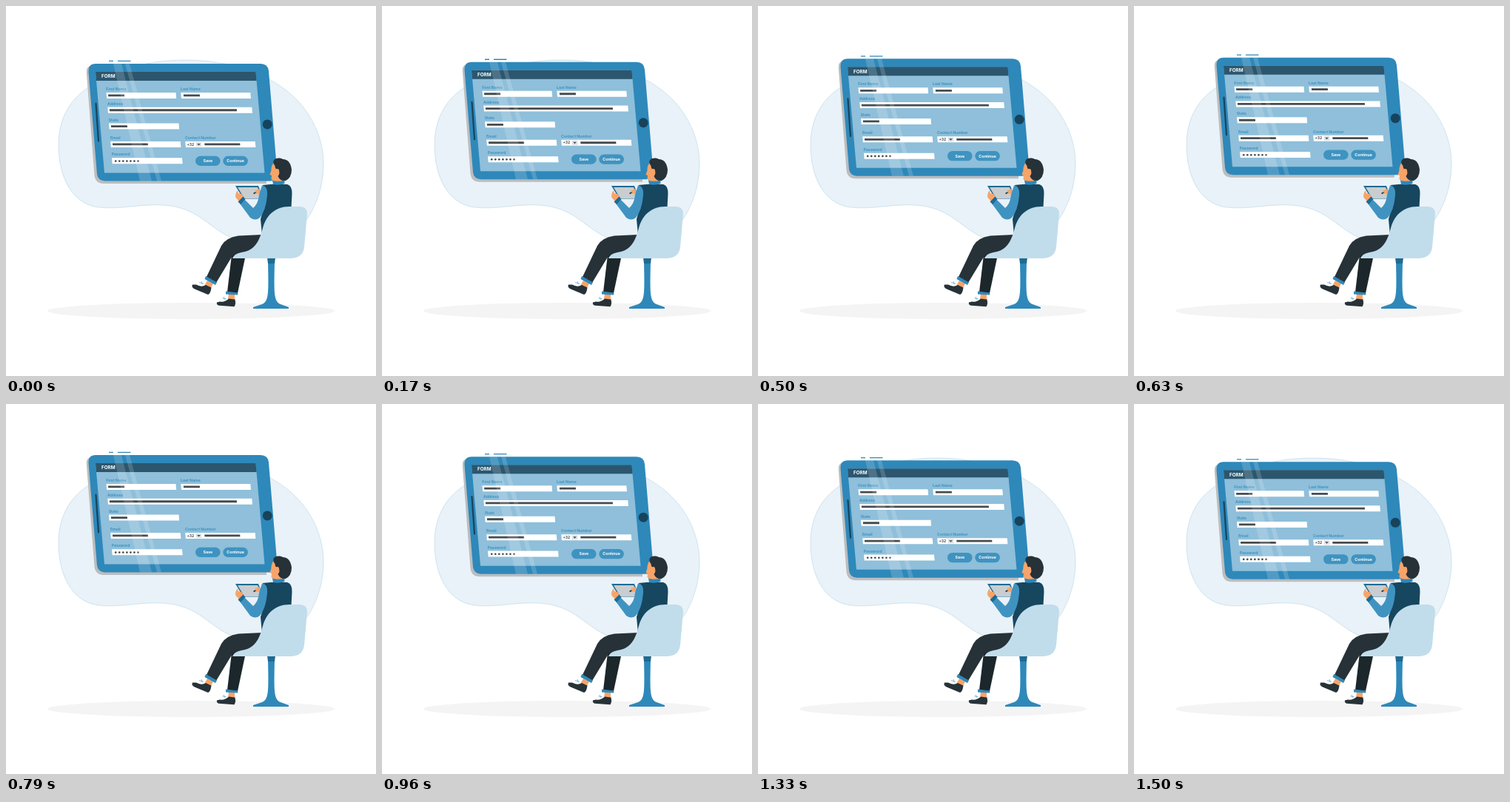
Animation of 500 by 500 pixels, one loop 1540 ms. Source, as an HTML page:

```html
<!DOCTYPE html>
<html lang="en">
<head>
<meta charset="utf-8">
<title>Form on a floating tablet</title>
<style>
html, body { margin: 0; width: 100%; height: 100%; overflow: hidden; background: #fff; }
svg { display: block; width: 100vw; height: 100vh; }
text { font-family: Inter, "Open Sans", sans-serif; font-weight: 700; }
</style>
</head>
<body>
<svg viewBox="0 0 500 500">
  <path d="M71 188C71 150 88 121 122 104C160 84 192 73 242 73C300 73 352 90 386 120C414 145 429 180 429 213C429 250 414 288 388 308C362 326 326 323 300 311C276 299 262 279 232 272C196 263 160 276 125 272C86 267 71 226 71 188Z" fill="#e9f2f8" stroke="#b4d6e9" stroke-width=".6"/>
  <ellipse cx="250" cy="412" rx="194" ry="11" fill="#f4f4f4"/>

  <g id="tablet">
    <path d="M139 74.5h6M151 74.5h17.500" stroke="#2e88ba" stroke-width="1.300"/>
    <path d="M119 81Q108 80 108.800 90L119.500 229Q121 240 132 240H352L350 81Z" fill="#bbbdbf"/>
    <path id="case" d="M121 78H344Q354 78 355 88L366.500 226Q367 236 357 236.500H134Q124 236 123 227L111.500 89Q111 78 121 78Z" fill="#2e88ba"/>
    <path d="M121 89H337.500L349.500 225.500H133Z" fill="#8fbfda"/>
    <path d="M121 89H337.500L338.600 101H122Z" fill="#2b566e"/>
    <path d="M121.500 132L125 182.500" stroke="#17435b" stroke-width="2.200" stroke-linecap="round"/>
    <circle cx="353.200" cy="160" r="6.500" fill="#17435b"/>
    <g id="form"></g>
    <path d="M145 78H156L197 236.500H181ZM161 78H167L210 236.500H204Z" fill="#fff" opacity=".16"/>
  </g>

  <!-- chair stem and far leg -->
  <path d="M354 346H363C362 390 362 399 371 403L382 407V409H334V407L346 403C355 399 355 390 354 346Z" fill="#2e88ba"/>
  <path d="M353 340H364L363 348H354Z" fill="#1f6a92"/>
  <path d="M301 388L309 389L309 398L300 397Z" fill="#f7a469"/>
  <path d="M305 336H324L313 388L299 386.500Z" fill="#1c272c"/>
  <path d="M297 385.500L313.500 387.500L313 390.500L297 389.500Z" fill="#2e88ba"/>
  <path d="M285 400.500Q284 404 288 404.700L308.500 406.200Q311 403 309.500 396.500L301 395.500Q296 400.500 289 399.500Z" fill="#263238"/>
  <path d="M292.500 395l5 .5M294 393l2 4" stroke="#7db9d9" stroke-width="1" fill="none"/>

  <!-- near leg -->
  <path d="M272 371L280 375L276 383L268 378Z" fill="#f7a469"/>
  <path d="M346 309L314 310.500Q297 313 291 324L271 366L284 374L307 336L346 338Z" fill="#263238"/>
  <path d="M270 365L285 373.500L283 377L268.500 369Z" fill="#2e88ba"/>
  <path d="M252 376.500Q250 380 255 382.500L273 390Q276.500 389 277.500 380.500L270 377Q264 380.500 257 376.500Z" fill="#263238"/>
  <path d="M261 373.500l6 2M264 372l1.500 4" stroke="#7db9d9" stroke-width="1" fill="none"/>

  <!-- body and head -->
  <path d="M347 242Q362 240 380 241Q387 243 386.500 254L384 300L346 310L344 288Q352 266 347 242Z" fill="#17465f"/>
  <path d="M361 226H373L374 239H363Z" fill="#f7a469"/>
  <path d="M362 211Q358 217 358.500 222L356.500 228L359 229L358.500 234Q360 237 365 236L372 229V212Z" fill="#f7a469"/>
  <path d="M361.500 213Q360 206 368 205.500Q372 205 374 207Q384 207 386 221Q386 233 377 236.500Q370 236 367.500 230Q371 226 368 220Q364 222 363.500 216Z" fill="#263238"/>
  <circle cx="366" cy="223" r="2.800" fill="#f7a469"/>
  <path d="M360 235.500Q367 238 376 235.500L376.500 240Q368 243 361 241Z" fill="#2e88ba"/>

  <!-- held slate and arms -->
  <path d="M310 243H341L348 261H321Z" fill="#1f6a92"/>
  <path d="M313 245H340L346 260H322Z" fill="#c9cdd0"/>
  <path d="M320 261.300H343" stroke="#e9f2f8" stroke-width="1.600"/>
  <path d="M334.500 253.500l6-3" stroke="#263238" stroke-width="1.600"/>
  <path d="M336 250L342 247L345 253L339 254Z" fill="#f7a469"/>
  <path d="M313 249Q309 254 310.500 259L316 265L322 259L318 254L314 253Z" fill="#f7a469"/>
  <path d="M346 242.500Q354 243 353 256Q351 277 343 286Q337 291 330 286L316 267L322 261L334 273Q341 267 342 255Z" fill="#4093c0"/>
  <path d="M313.500 264.500L320.500 257.500L323.500 261L317 268Z" fill="#1f6a92"/>

  <path d="M306 341H384Q401 341 403 326L407 281Q407 271 397 271H383C363 271 351 284 347 300C341 324 332 331 318 333Q308 335 306 341Z" fill="#c1ddeb"/>
</svg>
<script>
const LOOP = 1540, FPS = 24;
const ink = "#454b4f", blue = "#3f93c0";
const form = document.getElementById("form");
const tablet = document.getElementById("tablet");

function add(tag, attrs, content = "") {
  const el = document.createElementNS("http://www.w3.org/2000/svg", tag);
  for (const key in attrs) el.setAttribute(key, attrs[key]);
  el.textContent = content;
  form.append(el);
}

const label = (x, y, words, size = 5.2, fill = blue, anchor = "start") =>
  add("text", { x, y, "font-size": size, fill, "text-anchor": anchor }, words);

const bar = (x, y, w, h, fill) =>
  add("path", { d: `M${x} ${y}h${w}l${h * .085} ${h}h${-w}Z`, fill });

label(129, 97.3, "FORM", 6.3, "#fff");

// x, y, field width, entry offset, entry width, caption
[
  [135.5, 117, 94, 2.5, 22, "First Name"],
  [236.3, 117, 94, 3.5, 22, "Last Name"],
  [137.3, 136.8, 195, 2.5, 172, "Address"],
  [139, 158.6, 94.5, 2.8, 22, "State"],
  [141.2, 183, 94.5, 2.7, 48, "Email"],
  [242.2, 183, 94.5, 26, 48, "Contact Number"],
  [143, 205.4, 95, 0, 0, "Password"]
].forEach(([x, y, w, dx, len, words]) => {
  label(x - .3, y - 3, words);
  bar(x, y, w, 8, "#fff");
  if (len) bar(x + dx, y + 2.6, len, 2.8, ink);
});

label(244.4, 188.7, "+32", 5, ink);
bar(256.5, 184, 7.6, 6, "#dfe2e4");
add("path", { d: "M258.200 186h4.600l-2.300 2.500Z", fill: ink });
for (let i = 0; i < 7; i++) add("circle", { cx: 148.2 + i * 5.05, cy: 209.6, r: 1.35, fill: ink });

[[256, "Save"], [293.3, "Continue"]].forEach(([x, words]) => {
  add("rect", { x, y: 202.8, width: 33.6, height: 13.2, rx: 6.6, fill: blue });
  label(x + 16.8, 211.3, words, 5.3, "#fff", "middle");
});

// steady rise and fall, held on 24 steps per second
function draw() {
  const t = performance.now() % LOOP;
  const step = Math.floor((t + 3.4) * FPS / 1000) % 37;
  const phase = ((step * 1000 / FPS + 35) % LOOP) / LOOP;
  const lift = 1 - Math.abs(1 - 2 * phase);
  tablet.setAttribute("transform", `translate(0 ${(.4 - 10.2 * lift).toFixed(3)})`);
  requestAnimationFrame(draw);
}
draw();
</script>
</body>
</html>
```
